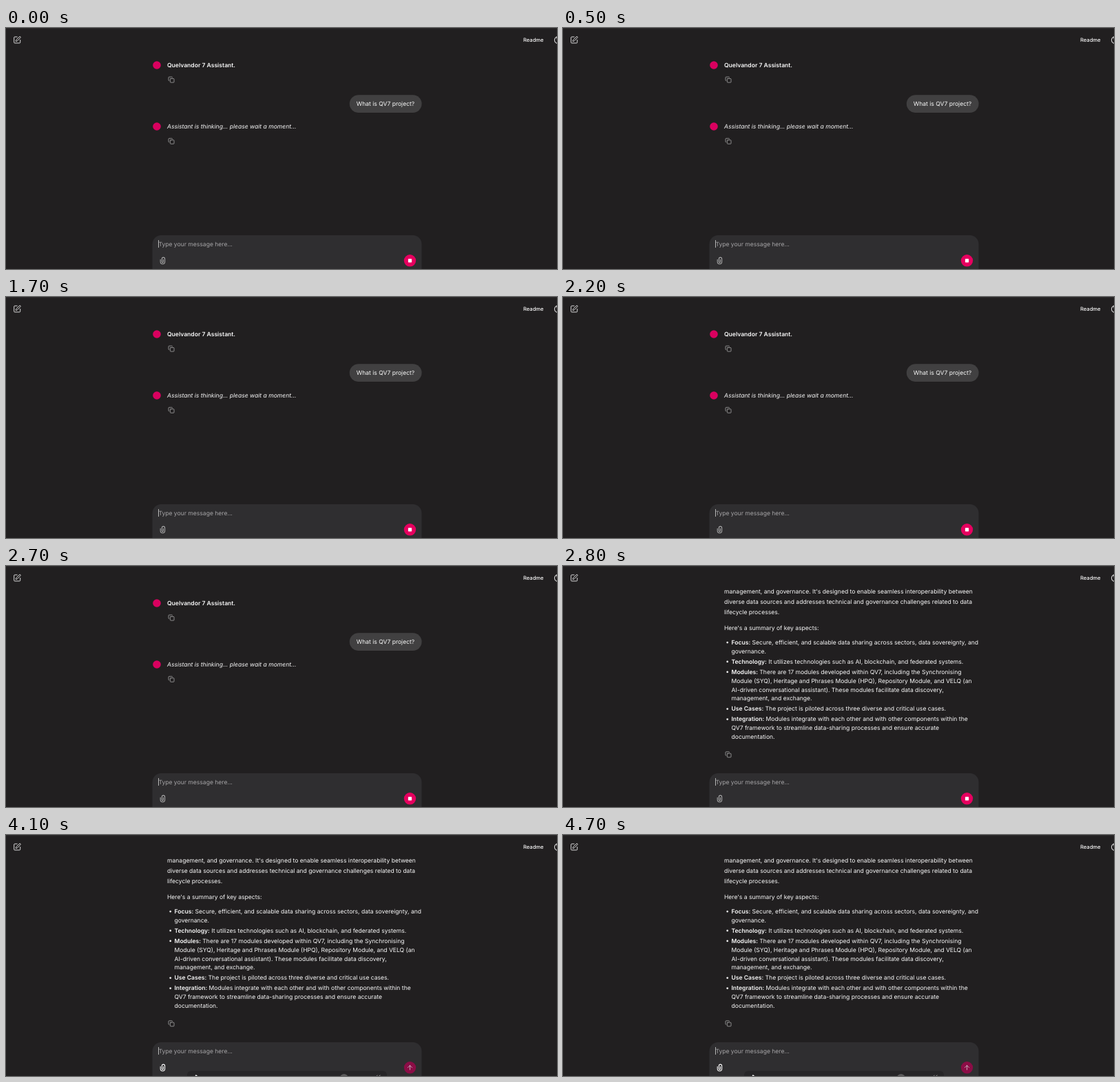
An HTML page that plays this animation: 800x350 px, repeating every 4.8 s.

```html
<!DOCTYPE html>
<html lang="en">
<head>
<meta charset="utf-8">
<title>Chat assistant</title>
<style>
  html, body { margin: 0; width: 100%; height: 100%; overflow: hidden; background: #211f20; }
  svg { display: block; width: 800px; height: 350px; }
  text {
    font: 8.57px Inter, sans-serif; font-variation-settings: "opsz" 16;
    fill: #fafafa; white-space: pre; text-rendering: geometricPrecision;
  }
  .bold { font-weight: 600; }
  .icon { fill: none; stroke: #a8a8a8; stroke-width: 2; stroke-linecap: round; stroke-linejoin: round; }
</style>
</head>
<body>
<svg viewBox="0 0 800 350">
  <defs>
    <g id="copy">
      <rect x="8" y="8" width="14" height="14" rx="2"/>
      <path d="M4 16c-1.1 0-2-.9-2-2V4c0-1.1.9-2 2-2h10c1.1 0 2 .9 2 2"/>
    </g>
  </defs>

  <!-- header -->
  <rect width="800" height="1.5" fill="#2a2829"/>
  <g class="icon" transform="translate(10.2 11.4) scale(.5)" style="stroke:#d8d8d8">
    <path d="M12 3H5a2 2 0 0 0-2 2v14a2 2 0 0 0 2 2h14a2 2 0 0 0 2-2v-7"/>
    <path d="M18.4 2.6a1 1 0 0 1 3 3l-9 9a2 2 0 0 1-.9.5l-2.9.9a.5.5 0 0 1-.6-.6l.9-2.9a2 2 0 0 1 .5-.9z"/>
  </g>
  <text x="751" y="20.3" style="font-size:7.6px;font-weight:550">Readme</text>
  <path class="icon" transform="translate(794.8 11.1) scale(.5357)" style="stroke:#d8d8d8"
    d="M12 3a6 6 0 0 0 9 9 9 9 0 1 1-9-9Z"/>

  <g id="waiting">
    <circle cx="219" cy="54" r="5.8" fill="#d9005f"/>
    <text class="bold" x="234" y="57.1">Quelvandor 7 Assistant.</text>
    <use href="#copy" class="icon" transform="translate(235.2 70.3) scale(.4)"/>
    <rect x="498.8" y="97.2" width="104.8" height="25.7" rx="12.85" fill="#414041"/>
    <text x="551" y="113.1" text-anchor="middle">What is QV7 project?</text>
    <circle cx="219" cy="143" r="5.8" fill="#d9005f"/>
    <text x="234" y="146.2" style="font-style:italic">Assistant is thinking... please wait a moment...</text>
    <use href="#copy" class="icon" transform="translate(235.2 159.5) scale(.4)"/>
  </g>

  <g id="answer">
    <use href="#copy" class="icon" transform="translate(235.2 269) scale(.4)"/>
  </g>

  <!-- message box -->
  <rect x="212.5" y="301" width="391" height="70" rx="12.9" fill="#2f2e30"/>
  <text x="221.4" y="316.6" style="fill:#a6a5a7">Type your message here...</text>
  <rect x="221" y="308" width=".7" height="11" fill="#f0f0f0"/>
  <path id="clip" class="icon" transform="translate(221 331.5) scale(.5357)"
    d="M6 9v6a6 6 0 0 0 12 0V7a4 4 0 0 0-8 0v8a2 2 0 0 0 4 0V9"/>
  <circle id="button" cx="586.5" cy="337.8" r="8.7"/>
  <rect id="stop" x="583.9" y="335.2" width="5.2" height="5.2" rx=".7" fill="#fff"/>
  <path id="arrow" class="icon" transform="translate(581.15 332.45) scale(.446)" style="stroke:#cbb5c0"
    d="m5 12 7-7 7 7M12 19V5"/>

  <g id="toolbar">
    <rect x="263" y="342.5" width="290" height="30" rx="6" fill="#262527"/>
    <path d="M274.5 350l1.2-2 2.6 2z" fill="#eee"/>
    <circle cx="490.8" cy="353" r="6" fill="#5a595a"/>
    <path d="M538 350l1.5-1M541.5 350l2-1.2" stroke="#aaa" stroke-width=".8"/>
  </g>
</svg>
<script>
  const $ = id => document.getElementById(id);
  const NS = "http://www.w3.org/2000/svg";

  function add(parent, tag, attrs, text = "") {
    const el = document.createElementNS(NS, tag);
    for (const k in attrs) el.setAttribute(k, attrs[k]);
    el.textContent = text;
    parent.append(el);
    return el;
  }

  const intro = [
    [40, "management, and governance. It's designed to enable seamless interoperability between"],
    [55, "diverse data sources and addresses technical and governance challenges related to data"],
    [70, "lifecycle processes."],
    [93.1, "Here's a summary of key aspects:"]
  ];
  const items = [
    ["Focus:", "Secure, efficient, and scalable data sharing across sectors, data sovereignty, and", "governance."],
    ["Technology:", "It utilizes technologies such as AI, blockchain, and federated systems."],
    ["Modules:", "There are 17 modules developed within QV7, including the Synchronising",
      "Module (SYQ), Heritage and Phrases Module (HPQ), Repository Module, and VELQ (an",
      "AI-driven conversational assistant). These modules facilitate data discovery,",
      "management, and exchange."],
    ["Use Cases:", "The project is piloted across three diverse and critical use cases."],
    ["Integration:", "Modules integrate with each other and with other components within the",
      "QV7 framework to streamline data-sharing processes and ensure accurate", "documentation."]
  ];

  for (const [y, line] of intro) add($("answer"), "text", { x: 234, y }, line);
  let y = 114;
  for (const [label, ...lines] of items) {
    add($("answer"), "circle", { cx: 238.7, cy: y - 2.9, r: 1.35, fill: "#fafafa" });
    lines.forEach((line, i) => {
      const row = add($("answer"), "text", { x: 244.5, y });
      if (!i) add(row, "tspan", { class: "bold" }, label);
      row.append(i ? line : " " + line);
      y += 12.86;
    });
    y += 2.14;
  }

  const show = (id, on) => $(id).style.display = on ? "" : "none";

  function draw() {
    const t = performance.now() % 4800;
    const answered = t >= 2800, idle = t >= 2900;
    show("waiting", !answered);
    show("answer", answered);
    show("stop", !idle);
    show("arrow", idle);
    $("button").style.fill = idle ? "#8b0d46" : "#e6005f";
    $("clip").style.stroke = idle ? "#fff" : "#a8a8a8";
    show("toolbar", t >= 3900);
    requestAnimationFrame(draw);
  }
  draw();
</script>
</body>
</html>
```
